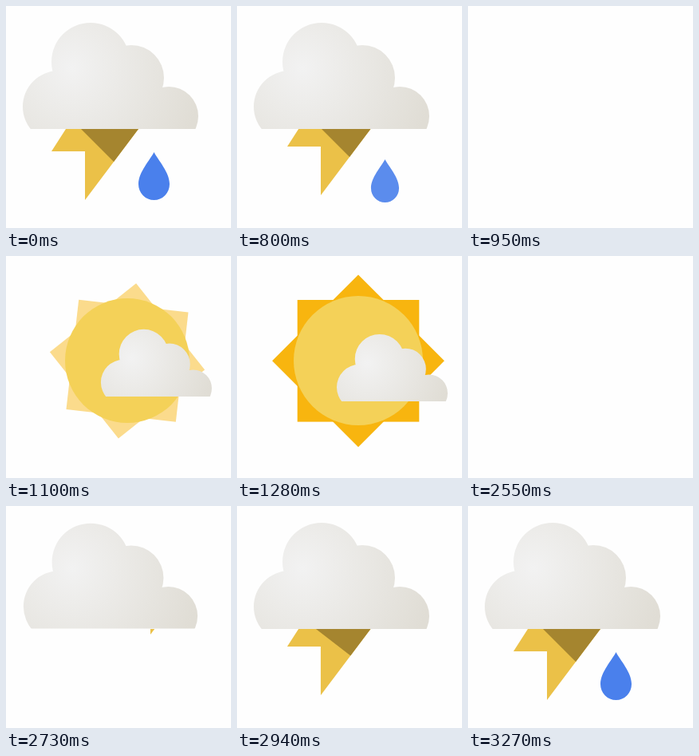
An HTML page that plays this animation: 282x278 px, repeating every 3300 ms.

```html
<!DOCTYPE html>
<html lang="en">
<head>
<meta charset="utf-8">
<title>Weather</title>
<style>
html, body { margin: 0; width: 100%; height: 100%; overflow: hidden; background: #fefefe; }
svg { display: block; width: 100%; height: 100%; }
</style>
</head>
<body>
<svg viewBox="0 0 282 278">
  <defs>
    <radialGradient id="mist" gradientUnits="userSpaceOnUse" cx="82" cy="78" r="165">
      <stop offset="0" stop-color="#f2f2f2"/>
      <stop offset="1" stop-color="#e0ddd5"/>
    </radialGradient>
    <linearGradient id="slope" x1="0" y1="0" x2="1" y2="1">
      <stop offset=".1" stop-color="#fbd26e"/>
      <stop offset=".45" stop-color="#dfb137"/>
      <stop offset=".55" stop-color="#dfb137"/>
      <stop offset=".9" stop-color="#aa820e"/>
    </linearGradient>
    <clipPath id="above"><rect width="282" height="154"/></clipPath>
    <clipPath id="below"><rect y="154" width="282" height="124"/></clipPath>
    <path id="boltShape" d="M139.3 54L57 182H99V243L241.3 54Z"/>
    <clipPath id="boltClip"><use href="#boltShape"/></clipPath>
    <rect id="square" x="-76.3" y="-76.3" width="152.6" height="152.6"/>
    <clipPath id="sunClip">
      <use href="#square" transform="translate(152 131.3)"/>
      <use href="#square" transform="translate(152 131.3) rotate(45)"/>
      <circle cx="152" cy="131" r="81"/>
    </clipPath>
    <path id="cloud" fill="url(#mist)" clip-path="url(#above)"/>
  </defs>

  <g id="storm">
    <g clip-path="url(#below)">
      <g id="bolt">
        <use href="#boltShape" fill="#ebc148"/>
        <g clip-path="url(#boltClip)"><polygon id="boltShade" fill="#a5852f"/></g>
      </g>
    </g>
    <path id="drop" fill="#4a80ec" d="M0-30C5-20 19.5-5 19.5 10A19.5 20 0 0 1-19.5 10C-19.5-5-5-20 0-30Z"/>
    <use id="bigCloud" href="#cloud"/>
  </g>

  <g id="sun">
    <g id="star">
      <g transform="rotate(45)">
        <use href="#square" fill="#f8b50f"/>
        <rect id="tipShade" x="0" y="-76.3" width="76.3" height="152.6" fill="#c8930a"/>
      </g>
      <use href="#square" fill="#f8b50f"/>
      <use id="squareShade" href="#square" fill="url(#slope)"/>
    </g>
    <circle id="disc" cx="152" cy="131" fill="#f4d158"/>
    <g clip-path="url(#sunClip)"><polygon id="sunShade" fill="#000" fill-opacity=".31"/></g>
    <use id="smallCloud" href="#cloud"/>
  </g>
</svg>
<script>
const LOOP = 3300, STEP = 30;
const $ = id => document.getElementById(id);
const set = (id, attrs) => {
  for (const k in attrs) $(id).setAttribute(k, attrs[k]);
};
const show = (id, on) => set(id, { visibility: on ? 'visible' : 'hidden' });
const span = (t, start, length) => Math.min(1, Math.max(0, (t - start) / length));
const rest = u => (1 - u) ** 3;

// Cloud: four overlapping bumps and a filled middle
const bump = (x, y, r) => `M${x - r} ${y}a${r} ${r} 0 1 1 ${2 * r} 0a${r} ${r} 0 1 1 ${-2 * r} 0Z`;
$('cloud').setAttribute('d',
  bump(66, 126, 45) + bump(106, 70, 49) + bump(157, 90, 41) + bump(204, 138, 37) +
  'M66 85H190V120L204 160H66Z');

// Wedge of shade under an edge, from (x, y) at an angle in degrees
function wedge(id, x, y, angle) {
  const a = angle * Math.PI / 180, c = 300 * Math.cos(a), s = 300 * Math.sin(a);
  set(id, { points: `${x},${y} ${x + c},${y + s} ${x + 400},${y + s} ${x + 400},${y}` });
}

function placeBolt(off, x, angle) {
  set('bolt', { transform: `translate(${off} ${-off})` });
  wedge('boltShade', x - off, 154 + off, angle);
}

function placeDrop(y, scale, opacity) {
  set('drop', { transform: `translate(185.5 ${y}) scale(${scale})`, opacity });
}

function scaleCloud(s) {
  set('bigCloud', { transform: `translate(131 100) scale(${s}) translate(-131 -100)` });
}

function leaveStorm(t) {
  const k = t < 800 ? 0 : (t - 770) / STEP;
  scaleCloud(1);
  placeBolt(6 * k, 94 + 12 * k, 45);
  placeDrop(213 + 6 * k, 1 - k / 10, 1 - k / 10);
}

function enterStorm(t) {
  scaleCloud(1 - rest(span(t, 2550, 225)));
  const off = 89 * rest(span(t, 2720, 370));
  placeBolt(off, 94 + off * 5 / 6, Math.max(0, 45 - 1.25 * off));
  const u = span(t, 3060, 210), e = 1 - rest(u);
  placeDrop(213 - 30 * (1 - e), e, e);
}

function drawSun(t) {
  const u = span(t, 950, 316), r = rest(u);
  set('star', {
    transform: `translate(152 131.3) rotate(${45 * r}) scale(${1 - 0.65 * r})`,
    opacity: u
  });
  set('disc', { r: 81 * (1 - rest(span(t, 950, 225))) });
  const off = 42 * r;
  set('smallCloud', {
    transform: `translate(${111.73 - off} ${84.67 - off}) scale(.632)`,
    opacity: span(t, 950, 120)
  });
  const shade = span(t, 1310, 240);
  set('tipShade', { opacity: shade });
  set('squareShade', { opacity: shade });
  wedge('sunShade', 131, 182, 45 * shade);
}

// Motion advances in steps; the long poses hold between them
function snap(t) {
  if (t < 800) return 0;
  const start = t < 2550 ? 800 : 2550;
  const held = start + STEP * Math.floor((t - start) / STEP);
  return start === 800 ? Math.min(held, 1550) : held;
}

function draw(time) {
  const t = snap(time), sunny = t >= 950 && t < 2550;
  show('storm', !sunny);
  show('sun', sunny);
  if (sunny) drawSun(t);
  else if (t < 950) leaveStorm(t);
  else enterStorm(t);
}

const begin = performance.now();
function tick() {
  draw((performance.now() - begin) % LOOP);
  requestAnimationFrame(tick);
}
tick();
</script>
</body>
</html>
```
